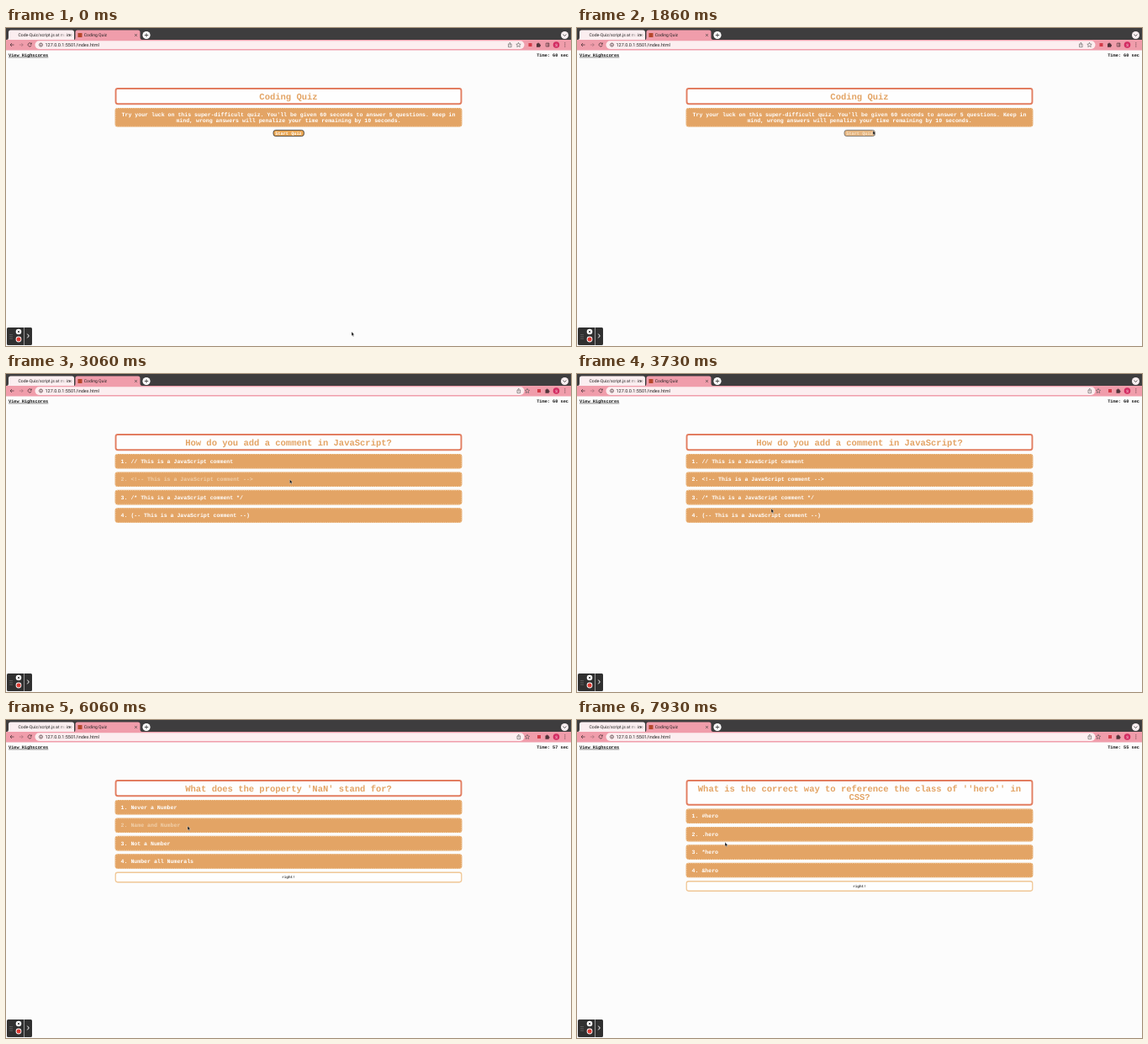
An HTML page for the animation above (8000 ms loop, 672 px wide and 378 px high).

```html
<!DOCTYPE html>
<html lang="en">
<head>
<meta charset="utf-8">
<title>Coding Quiz</title>
<style>
  html, body { margin: 0; width: 100%; height: 100%; overflow: hidden; background: #fcfcfc; }
  svg { display: block; width: 672px; height: 378px; }
  text { text-rendering: geometricPrecision; white-space: pre; }
  .ui { font-family: Roboto, "Liberation Sans", sans-serif; }
  .page { font-family: "Liberation Mono", Courier, monospace; font-weight: 700; }
</style>
</head>
<body>
<svg id="stage" viewBox="0 0 672 378">
  <defs>
    <linearGradient id="fade">
      <stop offset="0" stop-color="#fbeef0" stop-opacity="0"/>
      <stop offset="1" stop-color="#fbeef0"/>
    </linearGradient>
  </defs>
  <rect width="672" height="378" fill="#fcfcfc"/>

  <g class="ui" font-size="5.1" fill="#222">
    <rect width="672" height="14" fill="#3e3d3e"/>
    <path d="M1 14Q3 14 3 11V5Q3 2.5 5.500 2.500H78.500Q81 2.500 81 5V14Z" fill="#fbeef0"/>
    <path d="M81 14Q82.500 14 82.500 11V5Q82.500 2.500 85 2.500H157Q159.500 2.500 159.500 5V11Q159.500 14 162 14Z" fill="#f09dab"/>
    <text x="14.500" y="10.300">Code-Quiz/script.js at main ·</text>
    <rect x="62" y="4" width="10" height="9" fill="url(#fade)"/>
    <rect x="85.500" y="6" width="5" height="5" fill="#b5472c"/>
    <text x="92.800" y="10.300">Coding Quiz</text>
    <path d="M74.800 7.200l2.600 2.600m0-2.600l-2.600 2.600M153.200 7.200l2.600 2.600m0-2.600l-2.600 2.600" stroke="#333" stroke-width=".7"/>
    <circle cx="167" cy="8.500" r="4.600" fill="#fff"/>
    <path d="M164.700 8.500h4.600M167 6.200v4.600" stroke="#333" stroke-width=".8"/>
    <circle cx="664.500" cy="8.500" r="4.500" fill="#f8eef0"/>
    <path d="M662.600 7.600l1.900 1.900 1.900-1.900" fill="none" stroke="#333" stroke-width=".8"/>

    <rect y="14" width="672" height="12.500" fill="#f09dab"/>
    <rect x="34.500" y="15.300" width="582" height="9.600" rx="4.800" fill="#fceef0"/>
    <g fill="none" stroke="#4c3439" stroke-width=".75">
      <path d="M9.500 20H5m2-2l-2 2 2 2"/>
      <path d="M15.800 20h4.500m-2-2l2 2-2 2" opacity=".4"/>
      <path d="M30 18.800a2.100 2.100 0 1 0 .2 1.800M30.300 17.500v1.700h-1.700"/>
      <circle cx="41.500" cy="20" r="2"/>
      <path d="M41.500 19.700v1.300M41.500 18.700v.5"/>
    </g>
    <text x="46.500" y="22" font-size="5.500">127.0.0.1:5501/index.html</text>

    <g id="tools">
      <g fill="none" stroke="#555" stroke-width=".6">
        <path d="M598.300 19h-.8v3.600h3.600V19h-.8M599.300 21v-3.600m-1.200 1.200l1.200-1.200 1.200 1.200"/>
        <path d="M609.500 17.300l.8 1.800 1.900.2-1.400 1.300.4 1.900-1.700-1-1.700 1 .4-1.900-1.400-1.300 1.900-.2z"/>
      </g>
      <rect x="621.500" y="18" width="4" height="4" fill="#d23b48"/>
      <path d="M631 18.500h1.200a.9 .9 0 0 1 1.800 0h1.200v1.300a.9 .9 0 0 1 0 1.800v1.200h-4.200z" fill="#51343a"/>
    </g>
    <path id="panel" d="M642.300 18h3.600v4h-3.600zM644.600 18v4" fill="none" stroke="#51343a" stroke-width=".7"/>
    <circle cx="654.500" cy="20" r="3.800" fill="#d32c62"/>
    <text x="654.500" y="21.600" font-size="4.500" fill="#fff" text-anchor="middle">S</text>
    <path d="M664.800 17.800v.1m0 2v.1m0 2v.1" stroke="#51343a" stroke-width="1" stroke-linecap="round"/>
  </g>

  <g class="page" font-size="5.250" fill="#111">
    <text x="3" y="33.900">View Highscores</text>
    <path d="M3 34.900h47.300" stroke="#111" stroke-width=".5"/>
    <text id="clock" x="669" y="33.900" text-anchor="end"></text>
  </g>
  <g id="quiz" class="page"></g>

  <g>
    <path d="M2.500 356H21.500V377H2.500Q1 377 1 375.500V357.500Q1 356 2.500 356ZM22 356H29.500Q31 356 31 357.500V375.500Q31 377 29.500 377H22Z" fill="#303030"/>
    <path d="M5 364.500v.1m0 2.200v.1m0 2.200v.1m2-4.600v.1m0 2.200v.1m0 2.200v.1" stroke="#999" stroke-width=".9" stroke-linecap="round"/>
    <circle cx="15" cy="361" r="3.300" fill="#fff"/>
    <path d="M13.800 359.800l2.400 2.400m0-2.400l-2.400 2.400" stroke="#333" stroke-width=".8"/>
    <circle cx="15" cy="370" r="3.400" fill="#fff"/>
    <circle cx="15" cy="370" r="2.500" fill="#dc3a32"/>
    <path d="M25.300 363.600l2 2.400-2 2.400" fill="none" stroke="#fff" stroke-width="1"/>
  </g>
  <path id="cursor" d="M0 0V4.900L1.100 3.900 1.900 5.700 2.700 5.300 1.900 3.600H3.400Z" fill="#111" stroke="#fff" stroke-width=".35"/>
</svg>

<script>
const LOOP = 8000, UNIT = 200 / 3;
const LEFT = 129.6, WIDTH = 412.8, MID = 336;
const ORANGE = '#e3a465', CORAL = '#e27d60', LIGHT = '#f5d3a6', FADED = '#f0cfaa';
const byId = id => document.getElementById(id);

// Runs of picture updates: first, last (in units), count
const RUNS = [[1, 15, 7], [17, 30, 6], [33, 48, 7], [51, 66, 7],
              [69, 84, 7], [86, 99, 6], [102, 117, 7], [119, 119, 1]];
const STEPS = [0];
for (const [a, b, n] of RUNS)
  for (let i = 0; i < n; i++) {
    const unit = Math.floor(a + (n > 1 ? (b - a) * i / (n - 1) : 0));
    STEPS.push(Math.floor(unit * UNIT / 10) * 10);
  }

// Pointer tip: time, x, y
const PATH = [
  [0, 411, 361], [500, 411, 361], [1800, 352, 122], [2000, 352, 122],
  [2800, 340, 124.5], [2930, 340, 124.5], [3700, 231, 160], [4000, 231, 160],
  [4700, 235, 124.3], [5200, 231, 104], [5450, 231, 104], [6000, 216, 126],
  [6200, 216, 126], [6800, 203, 145.5], [7300, 203, 145.5], [7900, 176, 145.3]
];

const SCREENS = [
  { at: 0, title: ['Coding Quiz'], intro: [
    "Try your luck on this super-difficult quiz. You'll be given 60 seconds to answer 5 questions. Keep in",
    'mind, wrong answers will penalize your time remaining by 10 seconds.'] },
  { at: 2930, title: ['How do you add a comment in JavaScript?'], items: [
    '// This is a JavaScript comment', '<!-- This is a JavaScript comment -->',
    '/* This is a JavaScript comment */', '(-- This is a JavaScript comment --)'] },
  { at: 5400, title: ["What does the property 'NaN' stand for?"], note: 'right!', items: [
    'Never a Number', 'Name and Number', 'Not a Number', 'Number all Numerals'] },
  { at: 7250, title: ["What is the correct way to reference the class of ''hero'' in", 'CSS?'],
    note: 'right!', items: ['#hero', '.hero', '*hero', '&hero'] }
];

function add(tag, attrs, content = '') {
  const el = document.createElementNS('http://www.w3.org/2000/svg', tag);
  for (const key in attrs) el.setAttribute(key, attrs[key]);
  el.textContent = content;
  byId('quiz').append(el);
}

const label = (s, x, y, size, fill, anchor = 'middle') =>
  add('text', { x, y, 'font-size': size, fill, 'text-anchor': anchor }, s);

function frame(y, h, stroke, w, fill, extra = {}) {
  add('rect', { x: LEFT + w / 2, y: y + w / 2, width: WIDTH - w, height: h - w,
    rx: 2.4, fill, stroke, 'stroke-width': w, ...extra });
}

function panel(y, h) {
  frame(y, h, ORANGE, 1.3, ORANGE);
  frame(y, h, LIGHT, 1.1, 'none', { 'stroke-dasharray': '0 2.6', 'stroke-linecap': 'round' });
}

function pointer(t) {
  const i = PATH.findIndex(p => p[0] > t);
  if (i < 0) return PATH[PATH.length - 1].slice(1);
  const [t0, x0, y0] = PATH[i - 1], [t1, x1, y1] = PATH[i];
  const k = (t - t0) / (t1 - t0), e = k * k * (3 - 2 * k);
  return [x0 + (x1 - x0) * e, y0 + (y1 - y0) * e];
}

function drawQuiz(screen, px, py) {
  byId('quiz').replaceChildren();
  const { title, intro, items, note } = screen;
  const shift = (title.length - 1) * 10.5;
  frame(71, 20.2 + shift, CORAL, 1.9, '#fefefe');
  title.forEach((s, i) => label(s, MID, 84.7 + i * 10.5, 10.5, ORANGE));

  if (intro) {
    panel(95, 22.6);
    intro.forEach((s, i) => label(s, MID, 105 + i * 6.6, 6.5625, '#fff'));
    const over = px > 318 && px < 354.5 && py > 121 && py < 129;
    add('rect', { x: 318, y: 121.4, width: 36.4, height: 7.2, rx: 2.8,
      fill: over ? '#e5b57f' : '#e9a653', stroke: over ? '#666' : '#2b2b2b', 'stroke-width': .8 });
    label('Start Quiz', MID, 126.7, 5.25, over ? '#f8e4cb' : '#fff');
    return;
  }
  items.forEach((s, i) => {
    const y = 95 + shift + i * 21.4;
    const over = px > LEFT && px < LEFT + WIDTH && py > y + 1.4 && py < y + 16.2;
    panel(y, 17.6);
    label(`${i + 1}. ${s}`, 136.6, y + 10.8, 6.5625, over ? FADED : '#fff', 'start');
  });
  if (note) {
    frame(180.6 + shift, 12.8, '#f0c796', 1.3, '#fefefe');
    label(note, MID, 188.4 + shift, 4.37, '#444');
  }
}

let shown = -1;
function render(t) {
  if (t === shown) return;
  shown = t;
  const [x, y] = pointer(t);
  drawQuiz(SCREENS.filter(s => s.at <= t).pop(), x, y);
  byId('cursor').setAttribute('transform', `translate(${x} ${y})`);
  byId('clock').textContent = `Time: ${60 - Math.max(0, Math.floor((t - 2900) / 1000))} sec`;
  const compact = t >= 2300;
  byId('tools').setAttribute('transform', `translate(${compact ? 10.5 : 0} 0)`);
  byId('panel').setAttribute('visibility', compact ? 'hidden' : 'visible');
}

const start = performance.now();
function tick() {
  const t = Math.max(0, performance.now() - start) % LOOP;
  render(STEPS.filter(s => s <= t).pop());
  requestAnimationFrame(tick);
}
tick();
</script>
</body>
</html>
```
